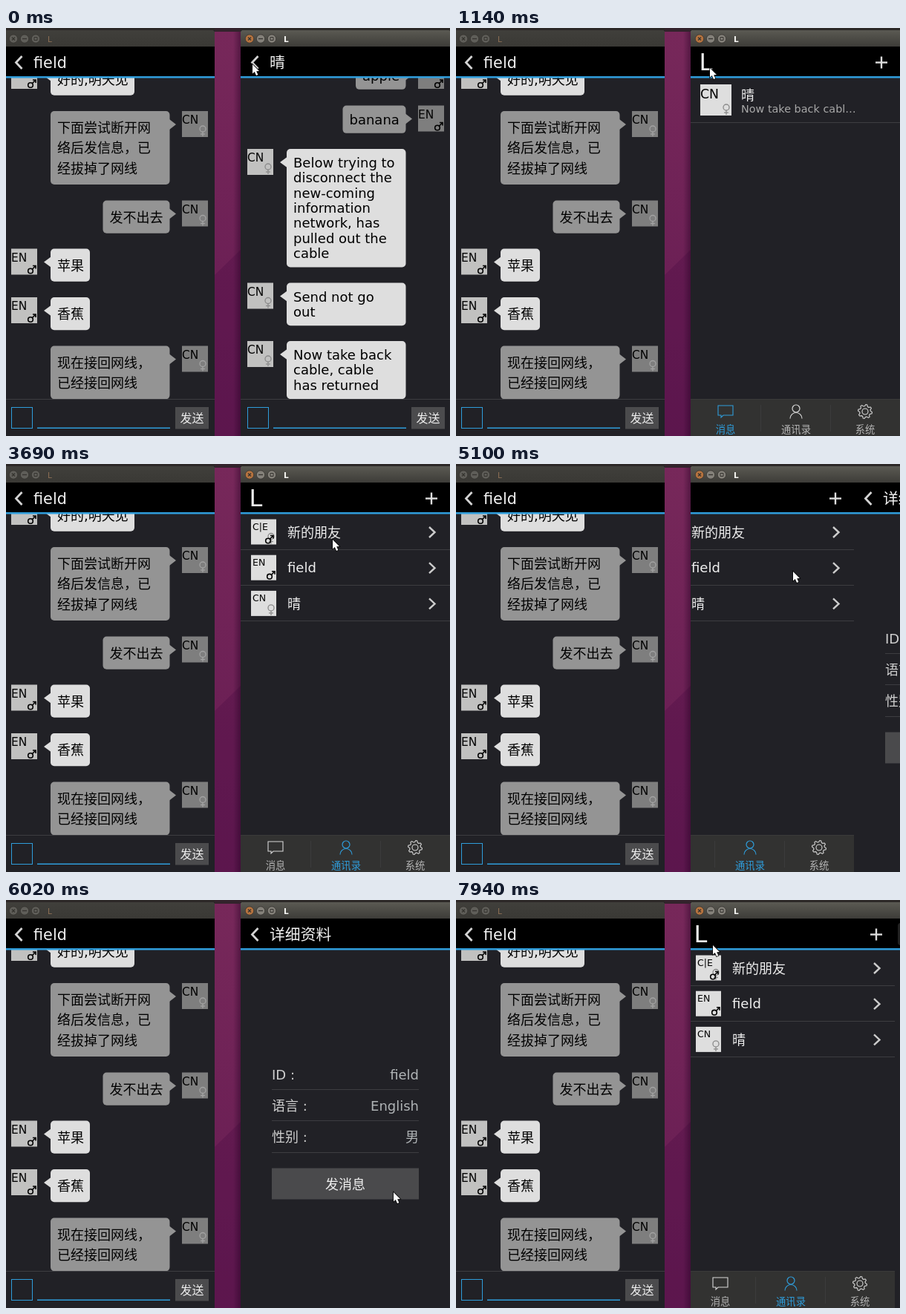
An HTML page with a canvas for the animation above (8 s loop, 598x550 px).

```html
<!DOCTYPE html>
<html lang="zh-CN">
<head>
<meta charset="utf-8">
<style>
html, body { margin: 0; width: 100%; height: 100%; overflow: hidden; background: #212126; }
canvas { display: block; }
</style>
</head>
<body>
<canvas id="stage" width="598" height="550"></canvas>
<script>
const g = document.getElementById('stage').getContext('2d');
const FONT = '"DejaVu Sans","Noto Sans CJK SC","Noto Sans CJK",sans-serif';
const W = 282, BG = '#212126', BLUE = '#2f9ddb', PALE = '#dedede', RULE = '#3d3d41';
const USER = 'field', PEER = '晴';

function rect(x, y, w, h, c) { g.fillStyle = c; g.fillRect(x, y, w, h); }

function text(s, x, y, size, c = '#000', align = 'left', weight = '') {
  g.font = `${weight} ${size}px ${FONT}`;
  g.textAlign = align;
  g.fillStyle = c;
  g.fillText(s, x, y);
}

function line(points, c, w = 1, close = false) {
  g.beginPath();
  points.forEach(([x, y]) => g.lineTo(x, y));
  if (close) g.closePath();
  g.strokeStyle = c;
  g.lineWidth = w;
  g.stroke();
}

function ring(x, y, r, c, w = 1, from = 0, to = 2 * Math.PI) {
  g.beginPath();
  g.arc(x, y, r, from, to);
  g.strokeStyle = c;
  g.lineWidth = w;
  g.stroke();
}

function at(x, y, draw) {
  g.save();
  g.translate(x, y);
  draw();
  g.restore();
}

function clipTo(x, y, w, h, draw) {
  g.save();
  g.beginPath();
  g.rect(x, y, w, h);
  g.clip();
  draw();
  g.restore();
}

function male(x, y, c = '#000') {
  ring(x - 2, y + 2, 3.3, c, 1.6);
  line([[x, y], [x + 4.5, y - 4.5]], c, 1.6);
  line([[x + 1, y - 5], [x + 5, y - 5], [x + 5, y - 1]], c, 1.6);
}

function female(x, y, c) {
  ring(x, y - 2, 4, c, 1.3);
  line([[x, y + 2], [x, y + 8]], c, 1.3);
  line([[x - 3, y + 5], [x + 3, y + 5]], c, 1.3);
}

function avatar(x, y, size, label, fill, signColor) {
  rect(x, y, size, size, fill);
  const chat = size === 35, small = size === 34;
  text(label, x + (small ? 2 : 0), y + (small ? 14.5 : chat ? 17 : 19), small ? 12.5 : chat ? 15.4 : 17.3);
  if (label !== 'EN') female(x + size - 7, y + size - 9, signColor);
  if (label !== 'CN') male(x + size - (label === 'EN' ? 7 : 9), y + size - 7);
}

function chevron(x, y, w, h, c, lw) {
  line([[x + w, y - h], [x, y], [x + w, y + h]], c, lw);
}

function header() {
  rect(0, 25, W + 2, 41, '#000');
  rect(0, 65, W + 2, 2.5, BLUE);
}

function backHeader(title, pressed) {
  header();
  if (pressed) {
    g.beginPath();
    g.roundRect(4, 31, 30, 30, 4);
    g.fillStyle = '#222';
    g.fill();
  }
  chevron(15.5, 46.5, 8, 8.5, '#d4d4d4', 2.8);
  text(title, 39, 53.5, 20.8, '#f0f0f0');
}

// One message: avatar, bubble with tail, and lines of text.
function message(own, y, lines, label, w = 160.5) {
  const cjk = lines[0].charCodeAt(0) > 255;
  const step = cjk ? 27.3 : 20.35, h = lines.length * step + 17;
  const x = own ? 222.5 - w : 62, fill = own ? '#949494' : PALE;
  avatar(own ? 239 : 9, Math.max(y, 47), 35, label, own ? '#7e7e7e' : '#c1c1c0', own ? '#a3a3a3' : '#8b8b8b');
  g.fillStyle = fill;
  g.beginPath();
  g.roundRect(x, y, w, h, 5);
  g.fill();
  const edge = own ? 222 : 62.5, tip = own ? 231 : 53;
  g.beginPath();
  g.moveTo(edge, y + 11);
  g.lineTo(tip, y + 18);
  g.lineTo(edge, y + 25);
  g.fill();
  lines.forEach((s, i) => text(s, x + 9, y + (cjk ? 29 : 25) + i * step, 18));
}

function chat(title, pressed, messages) {
  rect(0, 25, W + 2, 525, BG);
  clipTo(0, 67, W + 2, 433, () => messages.forEach(m => message(...m)));
  rect(0, 500, W + 2, 1, RULE);
  g.strokeStyle = BLUE;
  g.lineWidth = 1;
  g.strokeRect(9.5, 511.5, 28, 28);
  rect(44, 538.5, 179, 1.5, BLUE);
  rect(230, 511, 45, 29.5, '#4b4b4d');
  text('发送', 252.5, 531.5, 16, '#eee', 'center');
  backHeader(title, pressed);
}

const leftChat = [
  [false, 46.5, ['好的,明天见'], 'EN', 113],
  [true, 112, ['下面尝试断开网', '络后发信息，已', '经拔掉了网线'], 'CN'],
  [true, 232.5, ['发不出去'], 'CN', 90],
  [false, 297.5, ['苹果'], 'EN', 53],
  [false, 363, ['香蕉'], 'EN', 53],
  [true, 428.5, ['现在接回网线，', '已经接回网线'], 'CN']
];
const rightChat = [
  [true, 45.5, ['apple'], 'EN', 67.5],
  [true, 104.5, ['banana'], 'EN', 85],
  [false, 163, ['Below trying to', 'disconnect the', 'new-coming', 'information', 'network, has', 'pulled out the', 'cable'], 'CN'],
  [false, 343.5, ['Send not go', 'out'], 'CN'],
  [false, 422, ['Now take back', 'cable, cable', 'has returned'], 'CN']
];

const icons = [
  c => line([[-10, -8], [10, -8], [10, 5], [-3, 5], [-6, 8], [-6, 5], [-10, 5]], c, 1.1, true),
  c => {
    ring(0, -4, 5, c, 1.2);
    ring(0, 9.5, 8, c, 1.2, Math.PI, 2 * Math.PI);
  },
  c => {
    ring(0, 0, 4, c, 1.1);
    const teeth = [];
    for (let i = 0; i < 32; i++) {
      const a = (i + .5) * Math.PI / 16, r = i % 4 < 2 ? 9.5 : 7.3;
      teeth.push([r * Math.cos(a), r * Math.sin(a)]);
    }
    line(teeth, c, 1.1, true);
  }
];

function tabBar(active) {
  rect(0, 500, W, 50, '#323231');
  rect(0, 500, W, 1, '#3a3a3a');
  ['消息', '通讯录', '系统'].forEach((s, i) => {
    const x = [47, 142, 235][i], on = i === active;
    if (i) rect(94 * i, 508, 1, 36, '#3b3b3c');
    at(x, 517, () => icons[i](on ? BLUE : '#d8d8d8'));
    text(s, x, 546, 13.3, on ? BLUE : '#b4b4b4', 'center');
  });
}

function list(tab) {
  rect(0, 25, W, 525, BG);
  header();
  text('L', 11.5, 57, 32, '#eee');
  line([[249, 46.5], [265, 46.5]], '#ddd', 2.4);
  line([[257, 38.5], [257, 54.5]], '#ddd', 2.4);
  if (tab === 0) {
    avatar(13, 76, 42, 'CN', PALE, '#8b8b8b');
    text(PEER, 68, 96.5, 18, '#eee');
    text('Now take back cabl…', 68, 114, 14.4, '#a8a8a8');
    rect(0, 127, W, 1, RULE);
  } else {
    [['C|E', '新的朋友'], ['EN', USER], ['CN', PEER]].forEach(([label, name], i) => {
      const y = 48.2 * i;
      avatar(14, 74.5 + y, 34, label, PALE, '#8b8b8b');
      text(name, 63, 98.5 + y - (name === USER ? .7 : 0), 18, '#eee');
      chevron(261.5, 92 + y, -7.5, 7, '#ccc', 2.4);
      rect(0, Math.round(114.5 + y), W, 1, RULE);
    });
  }
  tabBar(tab);
}

function detail(pressed) {
  rect(0, 25, W, 525, BG);
  backHeader('详细资料', pressed);
  [['ID :', USER], ['语言 :', 'English'], ['性别 :', '男']].forEach(([label, value], i) => {
    const y = 42.3 * i;
    text(label, 42, 241.5 + y, 18, '#cfcfcf');
    text(value, 240, 241.5 + y, 18, '#b0b4b6', 'right');
    rect(42, Math.round(255 + y), 198, 1, RULE);
  });
  rect(42, 361.5, 198, 42, '#4a4a4c');
  text('发消息', 141, 389.5, 18, '#eee', 'center');
}

function titleBar(focused) {
  const shade = g.createLinearGradient(0, 3, 0, 25);
  shade.addColorStop(0, focused ? '#5b5a53' : '#403f3b');
  shade.addColorStop(1, focused ? '#3d3c38' : '#3a3935');
  rect(0, 0, W + 2, 3, '#2c2827');
  g.fillStyle = shade;
  g.beginPath();
  g.roundRect(0, 3, W + 1, 22, [4, 4, 0, 0]);
  g.fill();
  [12, 27, 42].forEach((x, i) => {
    g.beginPath();
    g.arc(x, 14.5, 5.7, 0, 7);
    g.fillStyle = focused ? (i ? '#84817a' : '#b5733f') : '#5f5e59';
    g.fill();
    const c = '#35332f';
    ring(x, 14.5, 5.7, c, .8);
    if (i === 0) {
      line([[x - 2, 12.5], [x + 2, 16.5]], c, 1.2);
      line([[x + 2, 12.5], [x - 2, 16.5]], c, 1.2);
    } else if (i === 1) line([[x - 3, 14.5], [x + 3, 14.5]], c, 1.3);
    else line([[x - 2, 12.5], [x + 2, 12.5], [x + 2, 16.5], [x - 2, 16.5]], c, 1, true);
  });
  text('L', 58, 18.5, 10.5, focused ? '#f4f4f0' : '#8d7055', 'left', focused ? 'bold' : '');
}

function desktop() {
  const fade = g.createLinearGradient(0, 0, 0, 550);
  fade.addColorStop(0, '#77285a');
  fade.addColorStop(1, '#651b52');
  rect(281, 0, 35, 550, fade);
  g.beginPath();
  [[281, 333], [316, 299], [316, 550], [281, 550]].forEach(p => g.lineTo(...p));
  g.fillStyle = 'rgba(70,8,66,.28)';
  g.fill();
  const side = g.createLinearGradient(306, 0, 316, 0);
  side.addColorStop(0, 'rgba(30,0,30,0)');
  side.addColorStop(1, 'rgba(30,0,30,.4)');
  rect(306, 0, 10, 550, side);
  rect(281, 0, 35, 5, '#33232c');
}

// Pointer way-points: time, x, y.
const path = [
  [0, 332, 49], [110, 332, 49], [190, 335, 48], [590, 335, 48], [970, 338, 48], [1070, 338, 48],
  [1140, 342, 53], [1600, 480, 324], [1810, 480, 324], [2220, 461, 508], [2530, 461, 508],
  [2900, 468, 330], [3290, 443, 136], [3440, 439, 99], [3620, 439, 99], [3690, 440, 102],
  [3990, 452, 151], [4470, 452, 151], [4620, 454, 145], [5310, 454, 145], [5790, 434, 390],
  [5880, 460, 430], [6020, 522, 394], [6630, 493, 251], [7490, 338, 48], [7800, 338, 48],
  [7940, 346, 61], [8001, 346, 61]
];

function pointer(t) {
  const i = path.findIndex(p => p[0] > t), a = path[i - 1], b = path[i];
  const k = (t - a[0]) / (b[0] - a[0]);
  at(Math.round(a[1] + (b[1] - a[1]) * k), Math.round(a[2] + (b[2] - a[2]) * k), () => {
    g.beginPath();
    [[0, 0], [0, 12.5], [2.8, 10], [5, 15], [7.4, 14], [5.2, 9.2], [9, 9]].forEach(p => g.lineTo(...p));
    g.closePath();
    g.fillStyle = '#fff';
    g.strokeStyle = '#000';
    g.lineWidth = 1.4;
    g.stroke();
    g.fill();
  });
}

// Ease-out page slide, refreshed every 70 ms; lead is the time already run at its first step.
function slide(t, start, lead) {
  if (t < start) return 0;
  const u = Math.min(1, (Math.floor((t - start) / 70) * 70 + lead) / 250);
  return 1 - (1 - u) ** 3;
}

function pages(t) {
  const closeChat = slide(t, 590, 37), closeDetail = slide(t, 7800, 37);
  const openDetail = slide(t, 5100, 20) - closeDetail;
  const listX = Math.round(-W * (1 - closeChat + openDetail));
  if (listX > -W) at(listX, 0, () => list(t < 2290 ? 0 : 1));
  if (listX < 0) at(listX + W, 0, () => {
    if (t < 2000) chat(PEER, t >= 340 && t < 430, rightChat);
    else detail(t >= 7560);
  });
}

function draw(t) {
  desktop();
  clipTo(0, 0, 281, 550, () => at(-2, 0, () => {
    chat(USER, false, leftChat);
    titleBar(false);
  }));
  clipTo(316, 0, W, 550, () => at(316, 0, () => {
    pages(t);
    titleBar(true);
  }));
  pointer(t);
}

function tick() {
  draw(performance.now() % 8000);
  requestAnimationFrame(tick);
}
tick();
</script>
</body>
</html>
```
